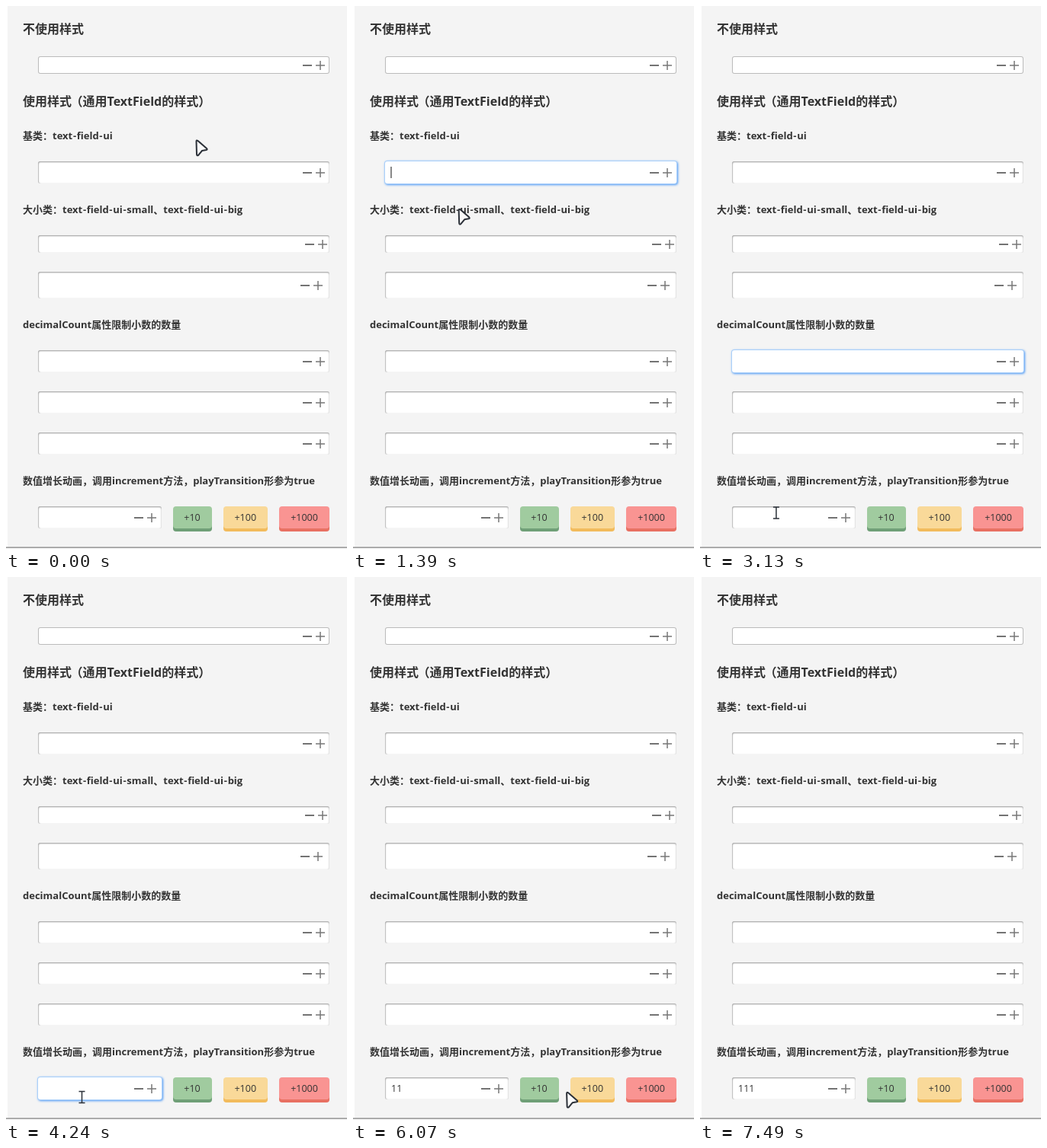
An HTML page that plays this animation: 447x713 px, repeating every 7.53 s.

```html
<!DOCTYPE html>
<html lang="zh-CN">
<head>
<meta charset="utf-8">
<style>
html, body { margin: 0; width: 100%; height: 100%; overflow: hidden; }
body { position: relative; background: #f4f4f4; color: #333; font: 12.5px "Open Sans", "Noto Sans CJK SC", sans-serif; }
main, #pointer { position: absolute; left: 0; top: 0; width: 447px; height: 713px; box-sizing: border-box; }
main { display: flex; flex-direction: column; gap: 25px; padding: 19px 23px 0 20px; border-left: 2px solid #fff; }
main::after { content: ""; position: absolute; left: -2px; right: 0; top: 710px; height: 2px; background: #aaa; border-bottom: 1px solid #fff; }
h1, h2 { margin: 0; white-space: nowrap; }
h1 { font-size: 16px; line-height: 22px; }
h2 { font-size: 13px; line-height: 18px; }
h1 b { margin-left: -1.5px; }
h2 i { font-style: normal; padding: 0 .7px; }
.row { display: flex; gap: 15px; }
.field, .row { flex: none; margin-left: 20px; }
.row .field { flex: 1; margin: 0; }
.field {
  position: relative; box-sizing: border-box; height: 29px; padding-right: 6.5px;
  display: flex; align-items: center; justify-content: flex-end;
  background: #fff; border-radius: 3px; box-shadow: inset 0 1px 2px #999, inset 1px 0 1px #ccc;
}
.small, .plain { height: 23px; }
.small { padding-right: 3.5px; }
.big { height: 35px; padding-right: 9.5px; }
.focus { box-shadow: 0 0 0 1px #a9cffa, 1px 1px 3px 1px #4a97f5; }
.plain { box-shadow: inset 0 0 0 1px #bbb; }
.plain.focus { box-shadow: inset 0 0 0 1px #039ed3, 0 0 0 .5px #039ed3; }
.value, .caret { position: absolute; top: calc(50% - 7.5px); }
.value { left: 8px; line-height: 16px; }
.caret { left: 7px; width: 2px; height: 15px; background: #888; }
.button { line-height: 29px; border-radius: 4px; text-align: center; background: var(--face); }
svg { fill: none; stroke-width: 1.5; }
</style>
</head>
<body>
<main>
  <h1>不使用样式</h1>
  <div class="field plain"></div>
  <h1>使用样式<b>（</b>通用TextField的样式）</h1>
  <h2>基类：text-field-ui</h2>
  <div class="field"></div>
  <h2>大小类：text-field-ui-small、text-field-ui-big</h2>
  <div class="field small"></div>
  <div class="field big"></div>
  <h2>decimalCount属性限制小数的数量</h2>
  <div class="field"></div>
  <div class="field"></div>
  <div class="field"></div>
  <h2>数值增长动画，调用increment方法，playTransition形参为true</h2>
  <div class="row">
    <div class="field"></div>
    <div class="button" style="--face: #a0cb9f; --edge: #6f9f77">+10</div>
    <div class="button" style="--face: #f9d999; --edge: #f2bb5c">+100</div>
    <div class="button" style="--face: #f99492; --edge: #e87062">+1000</div>
  </div>
</main>
<svg id="pointer" stroke="#2b3038">
  <path id="arrow" d="M.5 2Q.5 -.5 2.5 1L14 11Q15.500 12.500 13.500 13L8 14L3 20Q1 21 1 18.500Z"
    fill="#fafafa" stroke-width="2" stroke-linejoin="round"/>
  <path id="beam" d="M-3.500 -7.500h8M-3.500 7.500h8M.5 -7.500v15"/>
</svg>
<script>
const LOOP = 7530, TYPED = 4440, LAST = 7;

const fields = [...document.querySelectorAll('.field')];
const buttons = [...document.querySelectorAll('.button')];
const arrow = document.getElementById('arrow'), beam = document.getElementById('beam');

for (const heading of document.querySelectorAll('h2')) {
  heading.innerHTML = heading.textContent.replace(/-/g, '<i>-</i>');
}
for (const field of fields) {
  field.innerHTML = `<svg width="29" height="12"><path stroke="#444" d="M0 6h12"/>
    <path stroke="#777" d="M17 6h12m-6 -6v12"/></svg><div class="value"></div><div class="caret"></div>`;
}
for (const button of buttons) {
  button.style.width = 28.5 + 7.5 * button.textContent.length + 'px';
}

const boxes = fields.map(field => field.getBoundingClientRect());
const value = fields[LAST].querySelector('.value');

// each click: time and the field that takes the focus
const clicks = [[550, 0], [1190, 1], [2620, 4], [3710, LAST], [5230, -1]];
const presses = [5230, 6470];

// each move: departure, arrival, destination of the hot spot
const moves = [
  [50, 400, 187, 78], [650, 800, 155, 182], [800, 1300, 140, 218],
  [1375, 1700, 127, 562], [1700, 2300, 104, 474], [2940, 3280, 99, 683],
  [4700, 4980, 252, 679], [6000, 6310, 303, 674], [7420, 7500, 345, 730],
];

function pointerAt(t) {
  let x = 249, y = 176;
  for (const [depart, arrive, toX, toY] of moves) {
    const p = Math.min(1, Math.max(0, (t - depart) / (arrive - depart)));
    const eased = 1 - (1 - p) ** 3;
    x += (toX - x) * eased;
    y += (toY - y) * eased;
  }
  return [x, y];
}

function countAt(t) {
  if (t < TYPED) return '';
  const total = presses.reduce((sum, press, i) => {
    const elapsed = Math.max(0, t - press - 40);
    return sum + Number(buttons[i].textContent) * (1 - Math.exp(-elapsed / 100));
  }, 1);
  return Math.round(total);
}

function render(t) {
  const [x, y] = pointerAt(t);
  const overField = boxes.some(b => x > b.left && x < b.right && y > b.top && y < b.bottom);
  for (const [shape, visible] of [[arrow, !overField], [beam, overField]]) {
    shape.style.display = visible ? '' : 'none';
    shape.setAttribute('transform', `translate(${x} ${y})`);
  }

  const [since, focused] = clicks.findLast(([time]) => time <= t) || [0, -1];
  const typed = focused === LAST && t >= TYPED;
  const caretOn = (t - (typed ? TYPED : since)) % 1000 < 500;
  fields.forEach((field, i) => {
    const caret = field.querySelector('.caret');
    field.classList.toggle('focus', i === focused);
    caret.style.display = i === focused && caretOn ? '' : 'none';
    caret.style.left = typed ? '14px' : '7px';
  });
  value.textContent = countAt(t);

  buttons.forEach((button, i) => {
    const down = t >= presses[i] && t < presses[i] + 100;
    button.style.boxShadow = `0 ${down ? 2 : 4}px var(--edge)`;
  });
}

function tick() {
  render(performance.now() % LOOP);
  requestAnimationFrame(tick);
}
tick();
</script>
</body>
</html>
```
